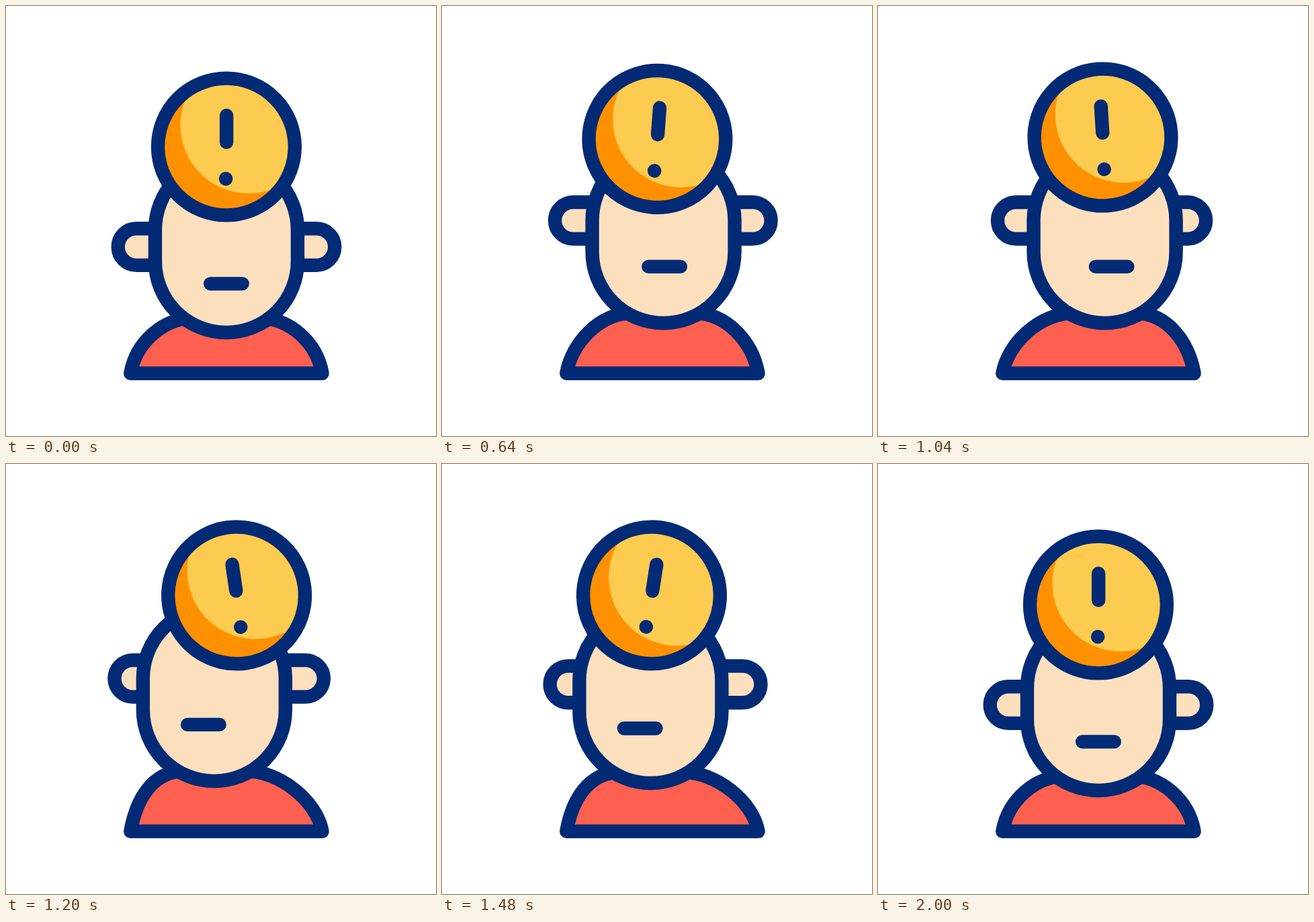
These frames come from a looping animation (640 by 640 pixels, 2420 ms). An HTML page with a canvas:

```html
<!DOCTYPE html>
<html lang="en">
<head>
<meta charset="utf-8">
<title>Head with alert ball</title>
<style>
html, body { margin: 0; width: 100%; height: 100%; overflow: hidden; background: #fff; }
canvas { display: block; width: 640px; height: 640px; }
</style>
</head>
<body>
<canvas id="stage" width="640" height="640"></canvas>
<script>
const ctx = document.getElementById('stage').getContext('2d');
const LOOP = 2420, STEP = 20;
const NAVY = '#032a75', SKIN = '#fce0be', RED = '#ff6050', YELLOW = '#fdcb50', ORANGE = '#ff9100';

// Eased value between [time, value] keys
function track(keys, t) {
  if (t <= keys[0][0]) return keys[0][1];
  for (let i = 1; i < keys.length; i++) {
    const [t0, a] = keys[i - 1], [t1, b] = keys[i];
    if (t < t1) {
      const s = (t - t0) / (t1 - t0);
      return a + (b - a) * s * s * (3 - 2 * s);
    }
  }
  return keys[keys.length - 1][1];
}

// Head turn: right, then left, then back to the middle
const turn = (right, left) => [[585, 0], [920, right], [1265, -left], [2000, 0]];
const HEAD_X = turn(21.9, 22.2);
const MOUTH_X = turn(43.5, 42);
const EAR_L = turn(18.7, 7.7);
const EAR_R = turn(5.5, 18.6);
const LIFT = [[200, 0], [585, 1], [1255, 1], [2000, 0]];
const BALL_X = [[475, 0], [820, -16.2], [1165, 16.2], [1495, -16.2], [2000, 0]];
const BALL_Y = [[390, 0], [730, -14], [1627, -14], [2000, 0]];

function paint(path, fill) {
  if (fill) {
    ctx.fillStyle = fill;
    ctx.fill(path);
  }
  ctx.stroke(path);
}

function line(x0, y0, x1, y1) {
  ctx.beginPath();
  ctx.moveTo(x0, y0);
  ctx.lineTo(x1, y1);
  ctx.stroke();
}

function disc(x, y, r, fill) {
  ctx.fillStyle = fill;
  ctx.beginPath();
  ctx.arc(x, y, r, 0, Math.PI * 2);
  ctx.fill();
}

function shoulders(dx, up) {
  const top = 464 - 7 * up, p = new Path2D();
  p.moveTo(185.3, 546.8);
  p.bezierCurveTo(193.5, 501, 233 + dx, top, 282 + dx, top);
  p.lineTo(374 + dx, top);
  p.bezierCurveTo(423 + dx, top, 462.5, 501, 470.7, 546.8);
  p.closePath();
  paint(p, RED);
}

function ear(x, y, side) {
  const r = 27.3, p = new Path2D();
  p.moveTo(x - side * 46, y - r);
  p.lineTo(x, y - r);
  p.arc(x, y, r, -Math.PI / 2, Math.PI / 2, side < 0);
  p.lineTo(x - side * 46, y + r);
  paint(p, SKIN);
}

function head(x, dy) {
  const r = 106, p = new Path2D();
  p.arc(x, 333 + dy, r, Math.PI, 0);
  p.arc(x, 380 + dy, r, 0, Math.PI);
  p.closePath();
  paint(p, SKIN);
}

function ball(dx, dy) {
  const p = new Path2D();
  p.arc(0, 0, 101.9, 0, Math.PI * 2);
  ctx.save();
  ctx.translate(328 + dx, 209.5 + dy);
  ctx.rotate(-dx * 0.555 * Math.PI / 180);
  ctx.save();
  ctx.clip(p);
  disc(0, 0, 102, ORANGE);
  disc(33, -32, 101.5, YELLOW);
  ctx.restore();
  paint(p);
  line(0.2, -46.5, 0.2, -6.7);
  disc(-0.8, 47.6, 10.3, NAVY);
  ctx.restore();
}

function draw(t) {
  const up = track(LIFT, t), hx = track(HEAD_X, t), mx = track(MOUTH_X, t);
  ctx.fillStyle = '#fff';
  ctx.fillRect(0, 0, 640, 640);
  ctx.strokeStyle = NAVY;
  ctx.lineWidth = 20.4;
  ctx.lineCap = ctx.lineJoin = 'round';

  shoulders(hx * 0.9, up);
  const earY = 358.6 - 39.3 * up;
  ear(194 + track(EAR_L, t), earY, -1);
  ear(462 + track(EAR_R, t), earY, 1);
  head(328 + hx, -14 * up);
  const mouthY = 413.4 - 25.5 * up;
  line(304.2 + mx, mouthY, 351.8 + mx, mouthY);
  ball(track(BALL_X, t), track(BALL_Y, t));
}

let start = null;
function frame(now) {
  if (start === null) start = now;
  const t = (now - start) % LOOP;
  draw(Math.floor(t / STEP + 0.001) * STEP);
  requestAnimationFrame(frame);
}
draw(0);
requestAnimationFrame(frame);
</script>
</body>
</html>
```
